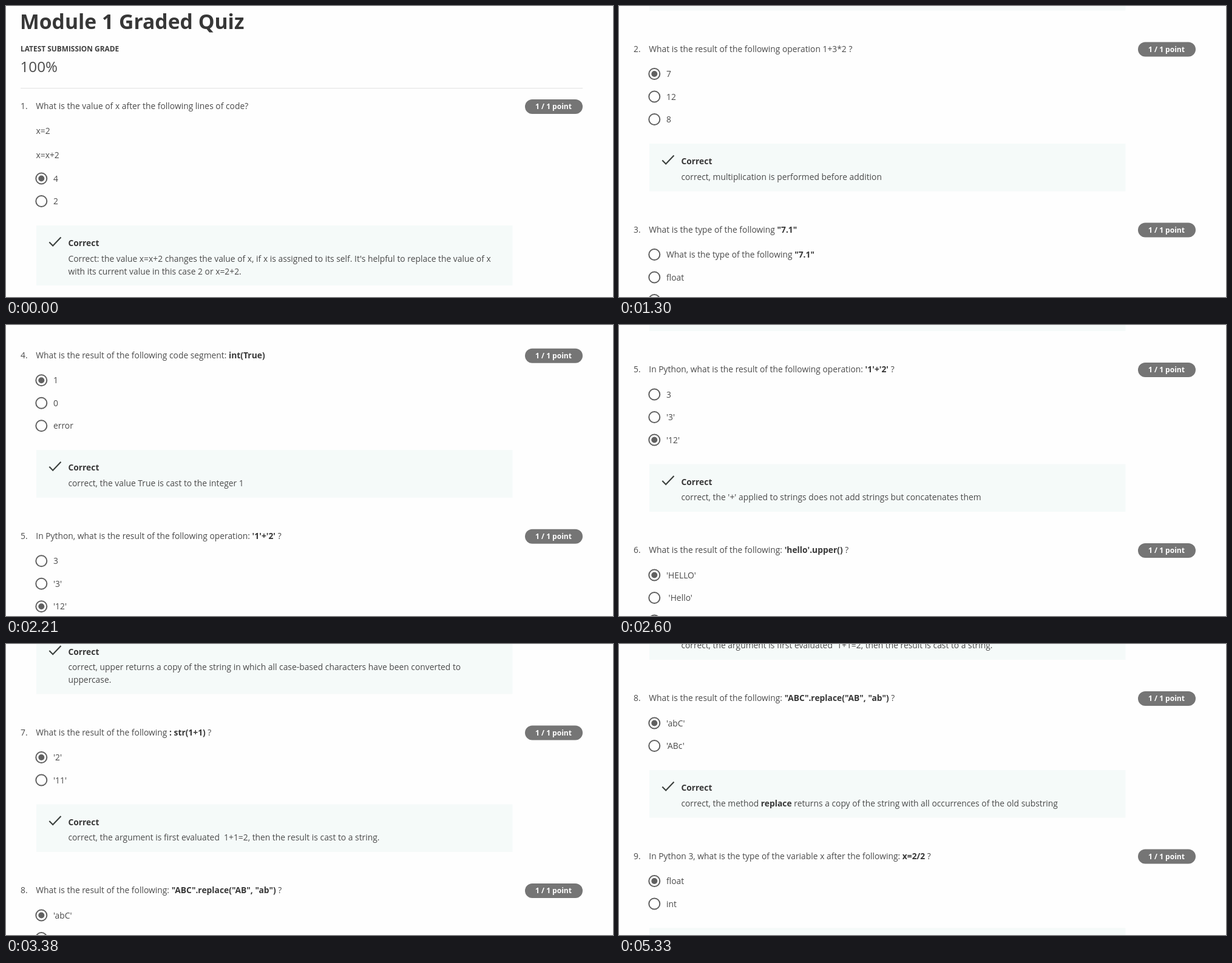
An HTML page with a canvas for the animation above (5980 ms loop, 1000x480 px).

```html
<!DOCTYPE html>
<html lang="en">
<head>
<meta charset="utf-8">
<title>Graded quiz</title>
<style>
  html, body { margin: 0; width: 100%; height: 100%; overflow: hidden; background: #fefefe; }
  canvas { display: block; width: 1000px; height: 480px; }
</style>
</head>
<body>
<canvas id="stage"></canvas>
<script>
const W = 1000, H = 480, LOOP = 5980, STEP = 130;
const FAMILY = '"Open Sans", "Noto Sans", sans-serif';
const BODY = 13.85;
const INK = '#4b4b4b', STRONG = '#383838';

const canvas = document.getElementById('stage');
const ctx = canvas.getContext('2d');
const ratio = window.devicePixelRatio || 1;
canvas.width = W * ratio;
canvas.height = H * ratio;

// Text between ** marks is bold; pick is the selected option.
const questions = [
  { ask: 'What is the value of x after the following lines of code?', code: ['x=2', 'x=x+2'],
    options: ['4', '2'], pick: 0,
    note: ["Correct: the value x=x+2 changes the value of x, if x is assigned to its self. It's helpful to replace the value of x",
           'with its current value in this case 2 or x=2+2.'] },
  { ask: 'What is the result of the following operation 1+3*2 ?',
    options: ['7', '12', '8'], pick: 0,
    note: ['correct, multiplication is performed before addition'] },
  { ask: 'What is the type of the following **"7.1"**',
    options: ['What is the type of the following **"7.1"**', 'float', 'string'], pick: 2,
    note: ['correct, the type is string'] },
  { ask: 'What is the result of the following code segment: **int(True)**',
    options: ['1', '0', 'error'], pick: 0,
    note: ['correct, the value True is cast to the integer 1'] },
  { ask: "In Python, what is the result of the following operation: **'1'+'2'** ?",
    options: ['3', "'3'", "'12'"], pick: 2,
    note: ["correct, the '+' applied to strings does not add strings but concatenates them"] },
  { ask: "What is the result of the following: **'hello'.upper()** ?",
    options: ["'HELLO'", " 'Hello'", "'hello'"], pick: 0,
    note: ['correct, upper returns a copy of the string in which all case-based characters have been converted to',
           'uppercase.'] },
  { ask: 'What is the result of the following **: str(1+1)** ?',
    options: ["'2'", "'11'"], pick: 0,
    note: ['correct, the argument is first evaluated  1+1=2, then the result is cast to a string.'] },
  { ask: 'What is the result of the following: **"ABC".replace("AB", "ab")** ?',
    options: ["'abC'", "'ABc'"], pick: 0,
    note: ['correct, the method **replace** returns a copy of the string with all occurrences of the old substring'] },
  { ask: 'In Python 3, what is the type of the variable x after the following: **x=2/2** ?',
    options: ['float', 'int'], pick: 0,
    note: ['correct, division gives a float in Python 3'] }
];

// Stack the questions down the page.
let nextY = 165;
for (const q of questions) {
  q.y = nextY;
  q.first = q.y + (q.code ? 119.5 : 41.5);
  q.box = q.first + (q.options.length - 1) * 37.5 + 40;
  q.height = 78.5 + (q.note.length - 1) * 20.5;
  nextY = q.box + q.height + 63;
}

// Scroll position as [time, offset].
const path = [
  [0, 0], [390, 0], [780, 197], [910, 197], [1820, 795.5], [2600, 1345],
  [3120, 1677.5], [3380, 1889], [3510, 1889], [3900, 2206], [LOOP, 2206]
];

function scrollAt(time) {
  const t = Math.floor(time / STEP) * STEP;
  const i = path.findIndex(p => p[0] > t);
  const [t0, y0] = path[i - 1], [t1, y1] = path[i];
  return y0 + (y1 - y0) * (t - t0) / (t1 - t0);
}

function text(str, x, y, size = BODY, weight = 400, color = INK) {
  ctx.font = `${weight} ${size}px ${FAMILY}`;
  ctx.fillStyle = color;
  ctx.fillText(str, x, y);
  return x + ctx.measureText(str).width;
}

function rich(str, x, y) {
  str.split('**').forEach((part, i) => {
    x = i % 2 ? text(part, x, y, BODY, 700, STRONG) : text(part, x, y);
  });
}

function radio(y, on) {
  ctx.strokeStyle = ctx.fillStyle = '#606060';
  ctx.lineWidth = 2;
  ctx.beginPath();
  ctx.arc(58.3, y, 9, 0, Math.PI * 2);
  ctx.stroke();
  if (!on) return;
  ctx.beginPath();
  ctx.arc(58.3, y, 5, 0, Math.PI * 2);
  ctx.fill();
}

function pill(y) {
  ctx.fillStyle = '#757575';
  ctx.beginPath();
  ctx.roundRect(855, y - 11, 95, 24, 12);
  ctx.fill();
  ctx.textAlign = 'center';
  text('1 / 1 point', 902, y + 5.3, 12, 700, '#fff');
  ctx.textAlign = 'left';
}

function feedback(q) {
  const y = q.box;
  ctx.fillStyle = '#f5faf9';
  ctx.fillRect(50, y, 784.5, q.height);
  ctx.strokeStyle = '#3a403d';
  ctx.lineWidth = 2.1;
  ctx.beginPath();
  ctx.moveTo(71.3, y + 27.5);
  ctx.lineTo(77.2, y + 33.4);
  ctx.lineTo(90.5, y + 19.5);
  ctx.stroke();
  text('Correct', 102.4, y + 34, BODY, 700, STRONG);
  q.note.forEach((line, i) => rich(line, 102.4, y + 59.8 + i * 21));
}

function question(q, index) {
  text(`${index + 1}.`, 24, q.y + 5);
  rich(q.ask, 49.3, q.y + 5);
  pill(q.y);
  (q.code || []).forEach((line, i) => text(line, 49.5, q.y + 45.5 + i * 40.5));
  q.options.forEach((label, i) => {
    const y = q.first + i * 37.5;
    radio(y, i === q.pick);
    rich(label, 78, y + 5);
  });
  feedback(q);
}

function header() {
  text('Module 1 Graded Quiz', 23, 37.5, 33.7, 700, '#373737');
  text('LATEST SUBMISSION GRADE', 24, 75.2, 11.9, 700, '#404040');
  text('100%', 23.5, 108.5, 24.2);
  ctx.fillStyle = '#e6e6e6';
  ctx.fillRect(24, 135, 926, 1.3);
}

function draw(time) {
  const offset = scrollAt(time);
  ctx.setTransform(ratio, 0, 0, ratio, 0, 0);
  ctx.fillStyle = '#fefefe';
  ctx.fillRect(0, 0, W, H);
  ctx.translate(0, -offset);
  if (offset < 150) header();
  questions.forEach((q, i) => {
    if (q.y - 20 < offset + H && q.box + q.height > offset) question(q, i);
  });
}

const start = performance.now();
function tick() {
  draw((performance.now() - start) % LOOP);
  requestAnimationFrame(tick);
}
tick();
</script>
</body>
</html>
```
